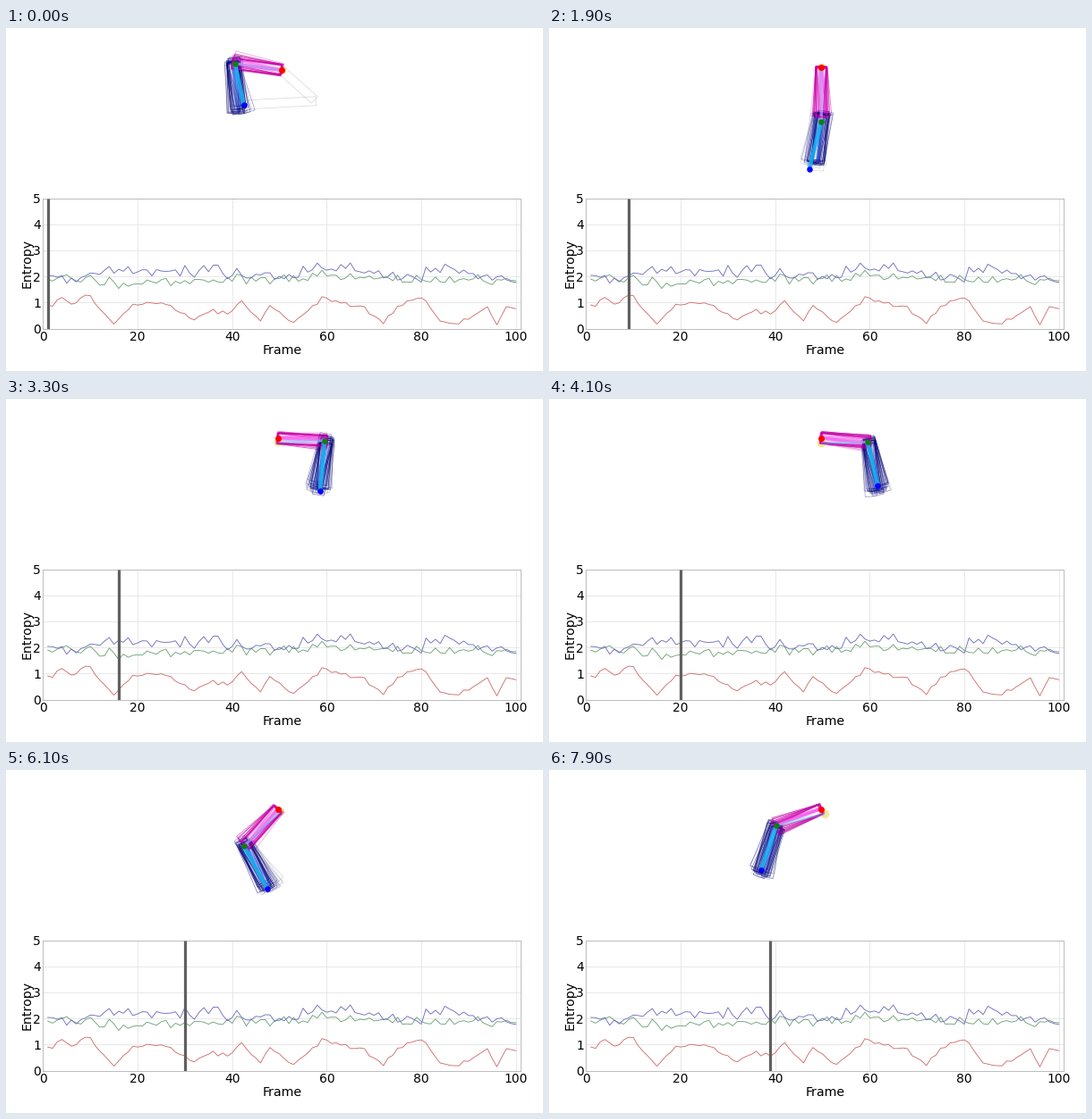
Recreate the animation shown at these times as a matplotlib script. Size 600 px wide and 384 px high, loop 8000 ms.

```python
import numpy as np
import matplotlib.pyplot as plt
from matplotlib.animation import FuncAnimation
from matplotlib.collections import LineCollection
from matplotlib.colors import to_rgba

W, H, DPI = 600, 384, 100
TICK = 100                      # ms per animation frame
PX = 72 / DPI                   # points per pixel

plt.rcParams.update({"font.family": "DejaVu Sans", "font.size": 10})


def series(keys, jitter, seed):
    """Entropy over 100 steps: a coarse trend plus seeded noise."""
    x, y = zip(*keys)
    noise = np.random.default_rng(seed).normal(0, jitter, 100)
    return np.interp(range(1, 101), x, y) + noise


RED = series([(1, .83), (4, 1.22), (6, .95), (9, 1.32), (15, .22), (19, .9),
              (25, 1), (32, .35), (36, .72), (39, .6), (42, 1.05), (46, .3),
              (48, .86), (53, .22), (59, 1.2), (68, .8), (72, .22), (75, .85),
              (80, 1.25), (84, .25), (88, .22), (94, .82), (96, .22),
              (98, .8), (100, .76)], .04, 3)
BLUE = series([(1, 2.25), (8, 1.85), (14, 2.2), (37, 2.25), (49, 2),
               (64, 2.35), (76, 1.85), (86, 2.3), (100, 1.85)], .12, 8)
GREEN = series([(1, 2), (16, 1.75), (40, 1.95), (70, 1.95), (100, 1.9)],
               .12, 5)


def heading(deg):
    a = np.radians(deg)
    return np.array([np.sin(a), np.cos(a)])


def lower_angle(step):
    """Swing of the lower link, eased between its turning points."""
    at, angle = [1, 11, 25, 32, 42], [12, -17, 25, 30, -32]
    u = np.interp(step, at, range(5))
    i = int(u)
    ease = .5 - .5 * np.cos(np.pi * (u - i))
    return angle[i] + ease * (angle[i + 1] - angle[i])


def wave(step, peak, period):
    return np.cos(2 * np.pi * (step - peak) / period)


def box(start, deg, length, half):
    d = heading(deg)
    n = half * np.array([d[1], -d[0]])
    end = start + length * d
    return np.array([start + n, end + n, end - n, start - n, start + n])


def build(step):
    """Line parts (points, colour, width) and joint positions."""
    rng = np.random.default_rng(step)
    upper = -(100 - .5 * step) * wave(step, 0, 36)
    lower = lower_angle(step)
    cloud = lower - 6 * wave(step, 1, 16.5)
    side, down = heading(upper)

    red = np.array([304, 43.5]) + 3.5 * np.exp((1 - step) / 3)
    green = red + (52 + 9 * down ** 2) * heading(upper)
    blue = green + (52.5 + 6 * wave(step, 13, 21)) * heading(lower)
    drift = min(1, step / 20) * side ** 2
    yellow = red + drift * np.array([2.5 - 2.5 * side, 6])
    spread = 2.8 + 1.5 * abs(side)
    parts = []

    def add(points, color, alpha, width):
        parts.append((points, to_rgba(color, alpha), width * PX))

    # A stray arm that dies out after the first steps.
    fade = .45 * np.exp(1 - step)
    add(box(red, 48, 50, 5), "#b0b0b0", fade, .8)
    add(box(red + 52 * heading(48), -87, 76, 5), "#b0b0b0", fade, .8)

    for k in range(6):
        at = red + 55 * heading(upper) + rng.normal(0, 2, 2)
        add(box(at, cloud + rng.normal(0, 1.6 * spread), 56, 7),
            "#606060", .25, .7)

    for k in range(28):
        p = red + rng.normal(0, .9, 2)
        t1 = upper + rng.normal(0, 2.8)
        elbow = p + 54 * heading(t1) + rng.normal(0, .8, 2)
        t2 = cloud + rng.normal(0, spread)
        add(box(elbow - 2 * heading(t2), t2, 56 + rng.normal(0, 1.5), 6.5),
            "#00007c", rng.uniform(.15, .55), .75)
        if k % 4 == 0:
            add([elbow, elbow + 52 * heading(t2)], "#1e50e0", .3, 3)
        if k % 2 == 0:
            add(box(p, t1, 55, 5.8), "#c400a4", rng.uniform(.15, .7), .9)
        if k % 5 == 0:
            add([p, elbow], "#ff4cf0", .4, 3)

    add([yellow, green], "#5ce0f4", .5, 3)
    add([red, green], "#ee7cf4", .45, 3)
    add(box(red, upper, 55, 5.8), "#d000a8", .7, 1.1)
    add([green, blue], "#12b4f4", .85, 4.5)
    return parts, yellow, red, green, blue


fig = plt.figure(figsize=(W / DPI, H / DPI), dpi=DPI, facecolor="white")

stage = fig.add_axes([0, 0, 1, 1])
stage.set(xlim=(0, W), ylim=(H, 0))
stage.axis("off")

left, right, top, bottom = 41.4, 574.9, 190.5, 336.7
chart = fig.add_axes([left / W, 1 - bottom / H,
                      (right - left) / W, (bottom - top) / H])
chart.set(xlim=(0, 101), ylim=(0, 5), xticks=range(0, 101, 20),
          yticks=range(6))
chart.tick_params(length=0, pad=1.8)
chart.tick_params(axis="x", pad=1.3)
chart.grid(color="#e4e4e4", lw=.6)
chart.set_axisbelow(True)
for spine in chart.spines.values():
    spine.set(color="#bcbcbc", linewidth=.7)
for data, color in ((RED, "#cf7070"), (GREEN, "#70a478"), (BLUE, "#7070bf")):
    chart.plot(range(1, 101), data, color=color, lw=.65)
cursor = chart.axvline(1, color="#606060", lw=3.2 * PX, zorder=5)
cursor.set_solid_capstyle("butt")
fig.text(308.6 / W, 1 - 365.4 / H, "Frame", size=10.2,
         ha="center", va="baseline")
fig.text(23.2 / W, 1 - 263.2 / H, "Entropy", size=10.2, rotation=90,
         ha="center", va="center")

arm = LineCollection([], zorder=2)
stage.add_collection(arm, autolim=False)


def dot(color, size, alpha=1, z=4):
    return stage.plot([], [], "o", color=color, ms=size * PX, mew=0,
                      alpha=alpha, zorder=z)[0]


joints = [dot("#f4e070", 9.5, .75, 1), dot("#ff0000", 7),
          dot("#0a8010", 6.5), dot("#0000ff", 6.5)]

scenes = [build(s) for s in range(1, 40)]


def draw(i):
    t = i * TICK
    step = 1 if t < 500 else 2 + (t - 500) // 200
    parts, *points = scenes[step - 1]
    paths, colors, widths = zip(*parts)
    arm.set_segments(paths)
    arm.set_color(colors)
    arm.set_linewidth(widths)
    for joint, (x, y) in zip(joints, points):
        joint.set_data([x], [y])
    cursor.set_xdata([step, step])
    return [arm, cursor, *joints]


anim = FuncAnimation(fig, draw, frames=80, interval=TICK, repeat=True,
                     repeat_delay=0, blit=False)
plt.show()
```
